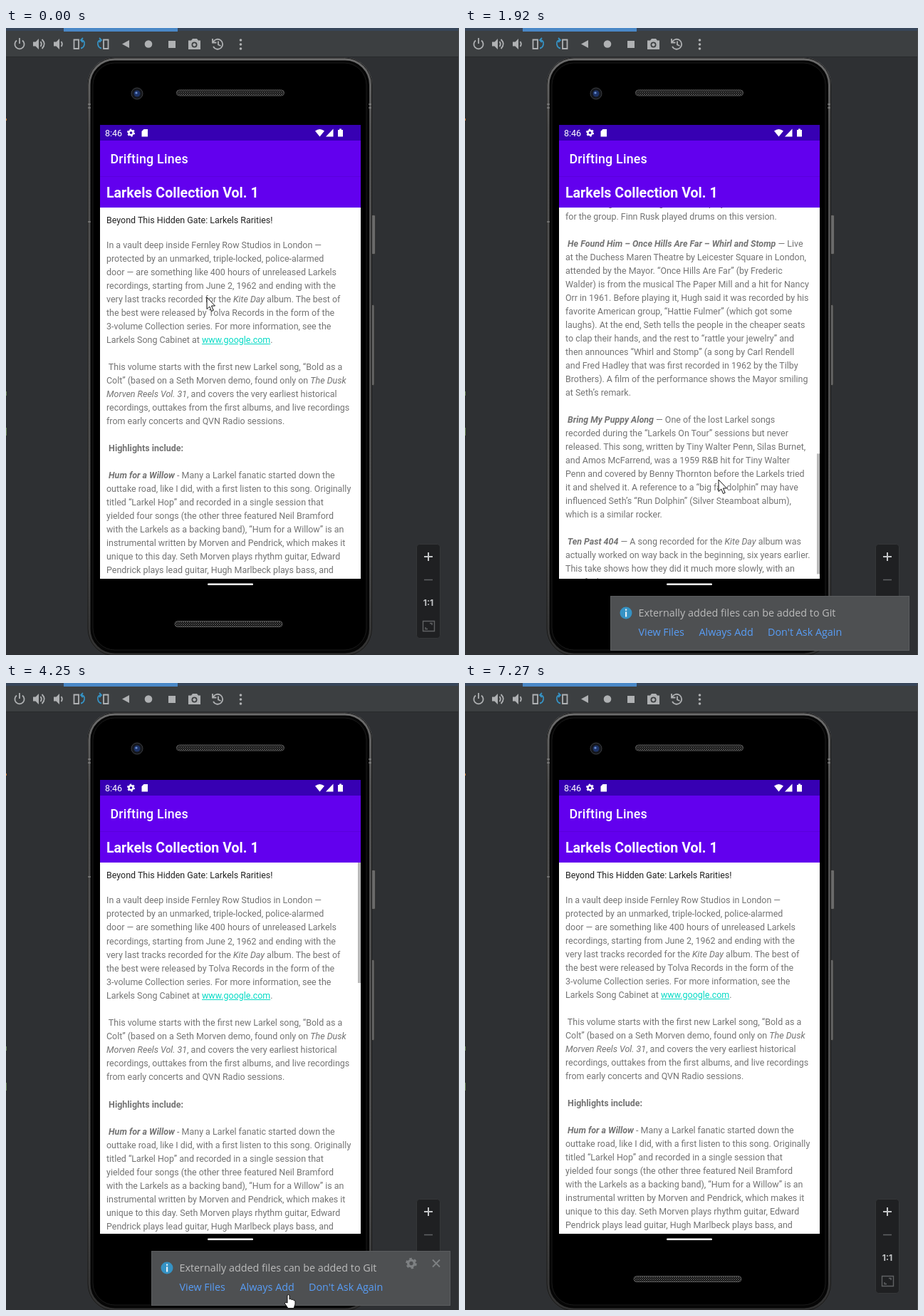
An HTML page for the animation above (7.46 s loop, 636 px wide and 880 px high).

```html
<!DOCTYPE html>
<html lang="en">
<head>
<meta charset="utf-8">
<title>Scrolling article in a phone emulator</title>
<style>
  html, body { margin: 0; width: 100%; height: 100%; overflow: hidden; background: #2e3033; }
  svg { position: absolute; left: 0; top: 0; }
  #page { position: absolute; left: 132px; top: 252px; width: 366px; height: 521px; overflow: hidden; background: #fff; }
  #article { position: absolute; left: 9px; top: 0; transform-origin: 0 0; white-space: pre;
    font: 12.46px/19px Roboto, sans-serif; color: #737373; }
  #article h1 { margin: 8px 0 16px; font: inherit; color: #222; }
  #article u { color: #03dac5; }
  #bar { position: absolute; right: 0; top: 0; width: 4px; height: 168.8px; background: #b9b9b9; }
  .ui { font-family: Roboto, sans-serif; fill: #fff; }
  .toast { font: 14.35px "Open Sans", sans-serif; fill: #589df6; }
  .line { fill: none; stroke: #afb1b3; stroke-width: 1.8; }
</style>
</head>
<body>
<svg width="636" height="880">
  <defs>
    <linearGradient id="metal" x2="0" y2="1">
      <stop offset="0" stop-color="#6c6c6c"/><stop offset=".12" stop-color="#505050"/>
      <stop offset=".8" stop-color="#4c4c4c"/><stop offset="1" stop-color="#303030"/>
    </linearGradient>
    <pattern id="mesh" width="3" height="3" patternUnits="userSpaceOnUse">
      <path d="M0 0L3 3M3 0L0 3" stroke="#666" stroke-width=".7"/>
    </pattern>
    <g id="gear" fill="none" stroke="currentColor">
      <circle r="3.6" stroke-width="2.8"/>
      <circle r="5.4" stroke-width="2.2" stroke-dasharray="2.83 2.83"/>
    </g>
  </defs>

  <!-- Editor window -->
  <path fill="#3c3f41" d="M0 0H636V40H0z"/>
  <path fill="#37465a" d="M0 0H636V4H0z"/>
  <path fill="#4a88c7" d="M81 0H241V5H81z"/>
  <path fill="#27292b" d="M0 40H636V41H0z"/>
  <path fill="#4a4c4e" d="M635 0H636V880H635z"/>
  <path fill="#cc7832" d="M0 127H1V130H0z"/>
  <path fill="#6a8759" d="M0 510H1V516H0zM0 561H1V572H0z"/>

  <!-- Emulator toolbar -->
  <g fill="#afb1b3">
    <path class="line" d="M15 17.5A6.6 6.6 0 1 0 23 17.5M19 14V22"/>
    <path d="M38 19.5H41.5L46 15V30L41.5 25.5H38zM67 19.5H70.5L75 15V30L70.5 25.5H67z"/>
    <path class="line" d="M48.5 19Q51 22.5 48.5 26M50.5 16Q57 22.5 50.5 29M77.5 19Q80 22.5 77.5 26"/>
    <path class="line" d="M95.500 16.500H102V29H95.500zM137 16.500H143.500V29H137z"/>
    <path class="line" style="stroke:#3592c4" d="M105 17Q111 17 110 23Q109 28 105 28.500M108 14L105 17L108 20M134 17Q128 17 129 23Q130 28 134 28.500M131 14L134 17L131 20"/>
    <path d="M163 22.500L173 17V28zM228 18H238V28H228z"/>
    <circle cx="200" cy="22.500" r="5.300"/>
    <path fill-rule="evenodd" d="M256 17.500H260L262 15H268L270 17.500H273V30H256zM260.500 23.500a4 4 0 1 0 8 0a4 4 0 1 0-8 0"/>
    <circle cx="264.500" cy="23.500" r="2.200"/>
    <path class="line" d="M291 19.500A7 7 0 1 1 291 26M290 15V20.500H295.500M298 18.500V23.500L301.500 25"/>
    <circle cx="329.500" cy="17" r="1.800"/><circle cx="329.500" cy="23" r="1.800"/><circle cx="329.500" cy="29" r="1.800"/>
  </g>

  <!-- Phone body -->
  <g fill="#6a6a6a" stroke="#333">
    <rect x="512" y="262.500" width="6.500" height="55" rx="1.500"/>
    <rect x="512" y="388.500" width="5" height="113" rx="1.500"/>
  </g>
  <rect x="116.500" y="43.500" width="395.500" height="836" rx="36" fill="#060606" stroke="url(#metal)" stroke-width="4"/>
  <rect x="115" y="42" width="398.500" height="839" rx="38" fill="none" stroke="#191919"/>
  <rect x="122" y="49" width="384" height="824" rx="31" stroke="#1b1b1b"/>
  <path d="M115 107H119M115 272H119M509 107H513M115 112H119M509 112H513" stroke="#999"/>
  <circle cx="184" cy="92" r="8" fill="#15171c" stroke="#3a3c40"/>
  <circle cx="184" cy="92" r="4.500" fill="#1c3266"/>
  <circle cx="183" cy="91" r="1.600" fill="#6c8fd0"/>
  <g fill="url(#mesh)" stroke="#555">
    <rect x="239.500" y="87" width="151" height="8" rx="4"/>
    <rect x="237" y="832.500" width="151" height="8" rx="4"/>
  </g>

  <!-- Phone screen -->
  <path fill="#3700b3" d="M132 136H498V158H132z"/>
  <path fill="#6200ee" d="M132 158H498V252H132z"/>
  <path fill="#5a00dc" d="M132 208H498V209H132z"/>
  <rect x="283" y="779.500" width="64" height="2.500" rx="1.200" fill="#fff"/>
  <g class="ui">
    <text x="139" y="152" font-size="12.500">8:46</text>
    <text x="146.500" y="190" font-size="17.800" font-weight="500" letter-spacing=".22">Drifting Lines</text>
    <text x="141" y="237.500" font-size="19.600" font-weight="700">Larkels Collection Vol. 1</text>
    <use href="#gear" transform="translate(175.500 147) scale(.85)" color="#fff"/>
    <path d="M193.500 142H199V152.500H190.500V145zM434 144.500Q440.500 139.500 447 144.500L440.500 152.500zM459.500 141.500V152.500H449zM466 143H468V141.500H471V143H473V152.500H466z"/>
  </g>

  <!-- Zoom panel -->
  <rect x="576.500" y="724.500" width="33" height="132" rx="4" fill="#1f2022" stroke="#353739"/>
  <path class="line" d="M587 742H599M593 736V748" style="stroke:#c4c6c8;stroke-width:2"/>
  <path class="line" d="M587 774.500H599M585.500 832.500H601.500V846.500H585.500zM589 841V843.500H592M595 835.500H598V838" style="stroke:#606264;stroke-width:1.400"/>
  <text x="593" y="811" text-anchor="middle" font-family="Inter, sans-serif" font-size="12" font-weight="700" fill="#c4c6c8">1:1</text>
</svg>

<div id="page"><div id="article"><h1>Beyond This Hidden Gate: Larkels Rarities!</h1>In a vault deep inside Fernley Row Studios in London —
protected by an unmarked, triple-locked, police-alarmed
door — are something like 400 hours of unreleased Larkels
recordings, starting from June 2, 1962 and ending with the
very last tracks recorded for the <i>Kite Day</i> album. The best of
the best were released by Tolva Records in the form of the
3-volume Collection series. For more information, see the
Larkels Song Cabinet at <u>www.google.com</u>.

 This volume starts with the first new Larkel song, “Bold as a
Colt” (based on a Seth Morven demo, found only on <i>The Dusk
Morven Reels Vol. 31</i>, and covers the very earliest historical
recordings, outtakes from the first albums, and live recordings
from early concerts and QVN Radio sessions.

<b> Highlights include:</b>

<b><i> Hum for a Willow</i></b> - Many a Larkel fanatic started down the
outtake road, like I did, with a first listen to this song. Originally
titled “Larkel Hop” and recorded in a single session that
yielded four songs (the other three featured Neil Bramford
with the Larkels as a backing band), “Hum for a Willow” is an
instrumental written by Morven and Pendrick, which makes it
unique to this day. Seth Morven plays rhythm guitar, Edward
Pendrick plays lead guitar, Hugh Marlbeck plays bass, and
Finn Rusk plays drums. The tune began as a small joke in
the studio, and the band kept it as an opening number for
their shows. It was later released in several countries and
is still a favorite with collectors.

<b><i> My Odette</i></b> and <b><i>Can’t We Dance</i></b> — At the same session, the
Larkels played on “My Odette” (the first-ever single with
Larkels playing), as the backing band for English singer Neil
Bramford, originally a member of the Tins. The popularity of
this single in Liverpool brought the Larkels to the attention of
Colin Hartop, who worked in the VORM record store and tried
to meet demand for the disc. Seth Morven then sings a fine
“Can’t We Dance” (his first-ever released vocal).

<b><i> Stumblin</i></b> — A Perry Tolber - Dave Quiller comedy song that
was a hit for the Tinkards in 1957, and a popular live favorite
of the Larkels. The Tinkards also had a hit with “Cantame
Tanto” and the Larkels covered that song as well. Basil Thorn
had by now replaced Finn Rusk on drums. The high falsetto is
Edward, who also plays a hesitant lead guitar. This is from their
first audition for Pavna Records in London on Jan 1., 1962, live
in the studio. The Doubtful Oak would later cover “Stumblin”
with a similar arrangement, Hatpin doing the Hugh vocals. A
live version is available on outtake records featuring the Oak
joined by the Ferry Twins!

<b><i> Hold Me So</i></b> — An early version of the song, played a bit slower
and with more of a blues feeling, and a cool bossa-nova beat in
middle. Hugh had to sing while Seth played harmonica — a first
for the group. Finn Rusk played drums on this version.

<b><i> He Found Him – Once Hills Are Far – Whirl and Stomp</i></b> — Live
at the Duchess Maren Theatre by Leicester Square in London,
attended by the Mayor. “Once Hills Are Far” (by Frederic
Walder) is from the musical The Paper Mill and a hit for Nancy
Orr in 1961. Before playing it, Hugh said it was recorded by his
favorite American group, “Hattie Fulmer” (which got some
laughs). At the end, Seth tells the people in the cheaper seats
to clap their hands, and the rest to “rattle your jewelry” and
then announces “Whirl and Stomp” (a song by Carl Rendell
and Fred Hadley that was first recorded in 1962 by the Tilby
Brothers). A film of the performance shows the Mayor smiling
at Seth’s remark.

<b><i> Bring My Puppy Along</i></b> — One of the lost Larkel songs
recorded during the “Larkels On Tour” sessions but never
released. This song, written by Tiny Walter Penn, Silas Burnet,
and Amos McFarrend, was a 1959 R&amp;B hit for Tiny Walter
Penn and covered by Benny Thornton before the Larkels tried
it and shelved it. A reference to a “big fat dolphin” may have
influenced Seth’s “Run Dolphin” (Silver Steamboat album),
which is a similar rocker.

<b><i> Ten Past 404</i></b> — A song recorded for the <i>Kite Day</i> album was
actually worked on way back in the beginning, six years earlier.
This take shows how they did it much more slowly, with an
R&amp;B feel to it.</div><div id="bar"></div></div>

<svg width="636" height="880">
  <g id="toast" class="toast">
    <rect x="204.500" y="797.500" width="419" height="76" fill="#4e5052" stroke="#5b5d5f"/>
    <circle cx="226" cy="821" r="8.500" fill="#3592c4"/>
    <path fill="#e4eef5" d="M225 815.500H227.200V817.700H225zM225 819.300H227.200V826.500H225z"/>
    <text x="243.500" y="826" fill="#bbb">Externally added files can be added to Git</text>
    <text x="243.500" y="853">View Files</text>
    <text x="328.500" y="853">Always Add</text>
    <text x="425" y="853">Don't Ask Again</text>
    <g id="controls" color="#7e8183">
      <use href="#gear" transform="translate(569 814.500) scale(1.200)"/>
      <path d="M599 809.500L609 819.500M609 809.500L599 819.500" stroke="currentColor" stroke-width="1.800"/>
    </g>
  </g>
  <g id="cursor" fill="#fff" stroke="#111">
    <path id="arrow" d="M0 0V16.500L3.800 13L6.500 19.500L9.200 18.300L6.500 12H11.500z"/>
    <path id="hand" d="M-2 2Q-2 .5-.5 .5T1 2V7Q3 5.500 4 7.500Q6 6.500 6.700 8.300Q9 8 9 10V14L7 19.500H-1L-5.500 13Q-6 10.500-2 12z"/>
  </g>
</svg>

<script>
const LOOP = 7460, VIEW = 521, CONTENT = 1608;

// Screen refreshes: [start, count], 120 ms apart within a run
const refreshes = [
  [0, 1], [140, 5], [770, 5], [1410, 4], [1920, 3], [2300, 2], [2560, 4], [3060, 1], [3200, 3], [3590, 1],
  [3740, 2], [4010, 4], [4520, 3], [4920, 6], [5670, 7], [6520, 4], [7030, 3]
].flatMap(([start, count]) => Array.from({ length: count }, (_, i) => start + i * 120));

// Tracks: [time, value...]
const scrollTrack = [
  [0, 0], [140, 58], [260, 180], [380, 280], [620, 390], [770, 510], [890, 618], [1020, 765], [1260, 940],
  [1530, 1035], [1770, 1063], [1920, 1066], [2040, 1087], [2920, 1087], [3060, 750], [3200, 470], [3320, 250],
  [3440, 90], [3590, 0], [5040, 0], [5160, 115], [5280, 400], [5400, 655], [5520, 856.5], [5670, 990],
  [5910, 1060], [6040, 820], [6160, 520], [6280, 270], [6400, 100], [6520, 0]
];
const stretchTrack = [
  [0, 0], [2040, 0], [2300, .02], [2420, .012], [2920, 0], [3440, 0], [3590, .02], [3740, .03], [4010, .012],
  [4250, .0048], [4640, 0], [6400, 0], [6520, .02], [6880, 0]
];
const barTrack = [
  [0, 0], [140, 1], [2420, 1], [2800, 0], [2920, 0], [3060, 1], [4370, 1], [4770, 0], [5040, 0], [5160, 1],
  [6880, 1], [7270, 0]
];
const cursorTrack = [
  [0, 282, 378], [140, 287, 320], [260, 290, 300], [620, 318, 520], [770, 327, 420], [890, 331, 312],
  [1260, 340, 420], [1770, 356, 634], [1920, 356, 634], [2160, 345, 400], [2300, 338, 249], [2420, 330, 260],
  [2920, 305, 418], [3060, 312, 756], [3200, 314, 756], [3440, 318, 740], [3860, 340, 735], [4010, 370, 800],
  [4130, 397, 858], [4370, 397, 858], [4640, 470, 850], [4770, 470, 850], [4920, 400, 740], [5040, 345, 651],
  [5160, 335, 536], [5910, 335, 536], [6040, 335, 773], [6400, 340, 773], [6520, 360, 790], [6760, 480, 840],
  [6880, 514, 845]
];

function sample(track, t) {
  const next = track.findIndex(key => key[0] > t);
  if (next < 0) return track.at(-1).slice(1);
  const [t0, ...from] = track[next - 1], [t1, ...to] = track[next];
  return from.map((v, i) => v + (to[i] - v) * (t - t0) / (t1 - t0));
}

const el = id => document.getElementById(id);
const show = (id, visible) => { el(id).style.display = visible ? "" : "none"; };

function draw() {
  const now = performance.now() % LOOP;
  const t = refreshes.findLast(tick => tick <= now);
  const [scroll] = sample(scrollTrack, t), [stretch] = sample(stretchTrack, t), [x, y] = sample(cursorTrack, t);

  // Overscroll stretches away from whichever end was reached
  const anchor = scroll > 500 ? -VIEW * stretch : 0;
  el("article").style.transform = stretch
    ? `translateY(${anchor}px) scaleY(${1 + stretch}) translateY(${-scroll}px)`
    : `translateY(${-scroll}px)`;
  el("bar").style.transform = `translateY(${scroll * VIEW / CONTENT}px)`;
  el("bar").style.opacity = sample(barTrack, t)[0];

  const onLink = t >= 4130 && t < 4900;
  show("toast", t >= 1140 && t < 4900);
  show("controls", t >= 4010);
  show("arrow", !onLink);
  show("hand", onLink);
  show("cursor", t < 7150);
  el("cursor").setAttribute("transform", `translate(${x} ${y})`);
  requestAnimationFrame(draw);
}
draw();
</script>
</body>
</html>
```
